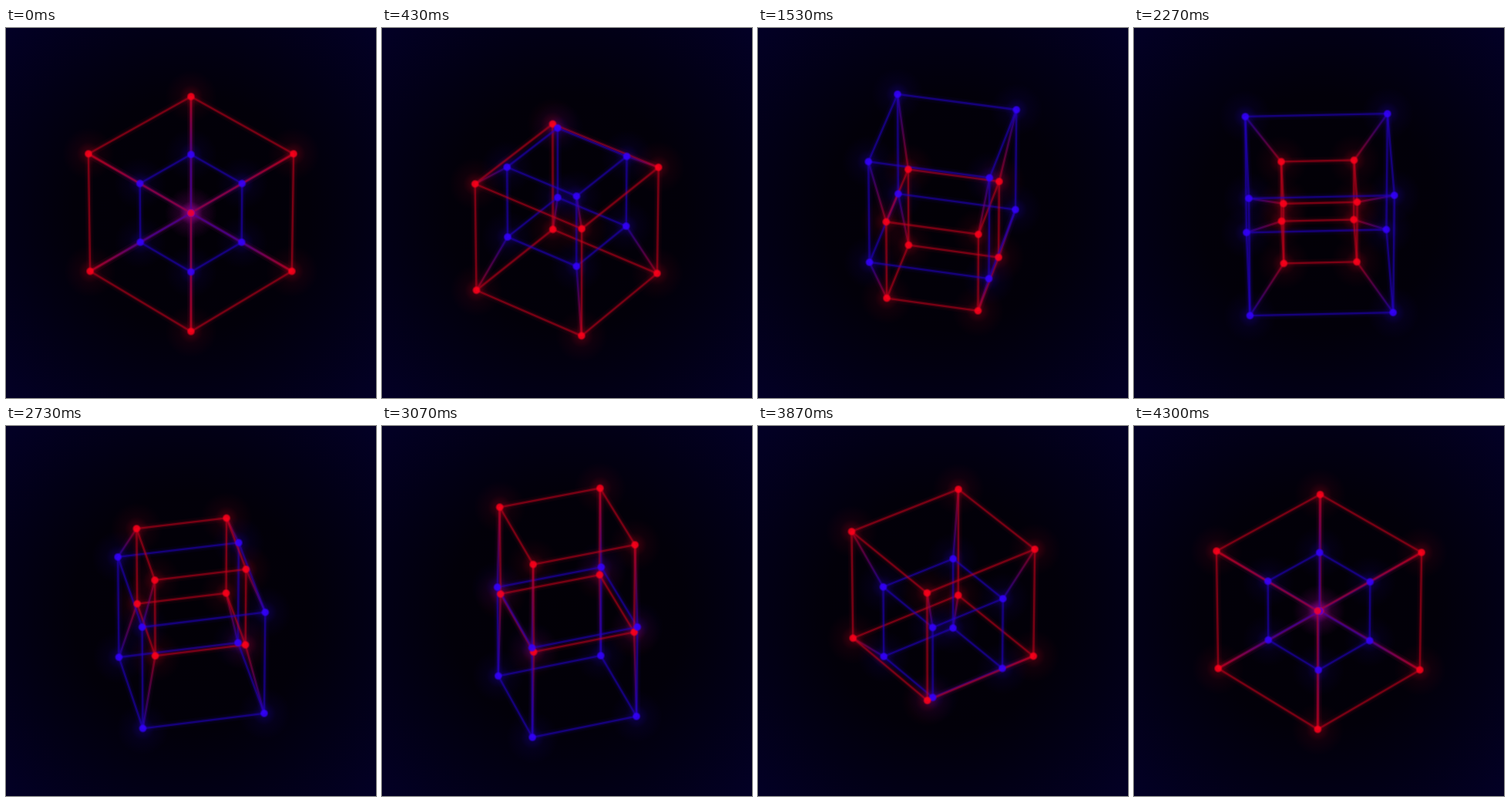
An HTML page with a canvas that plays this animation: 480 px wide and 480 px high, repeating every 4.33 s.

```html
<!DOCTYPE html>
<html lang="en">
<head>
<meta charset="utf-8">
<title>Tesseract</title>
<style>
  html, body { margin: 0; width: 100%; height: 100%; overflow: hidden; background: #000; }
  canvas { display: block; width: 100vw; height: 100vh; }
</style>
</head>
<body>
<canvas id="stage" width="480" height="480"></canvas>
<script>
const ctx = document.getElementById('stage').getContext('2d');
const SIZE = 480, MID = SIZE / 2;
const LOOP = 4330, STEPS = 130;
const UNIT = 46.66;                 // the cubes' half sides run between 1 and 2 units
const CAMERA = 6500;
const MORPH_LEAD = 0.0025;
const TILT = Math.atan(Math.SQRT1_2);
const SIN_TILT = Math.sin(TILT), COS_TILT = Math.cos(TILT);

const RED = { line: '200,0,26', dot: '255,0,26', glow: '255,0,20' };
const BLUE = { line: '34,0,200', dot: '52,0,255', glow: '40,0,255' };

// Key poses of the red cube as [growth, lift]; the blue cube takes the opposite.
const POSES = [[1, 0], [0, -1], [-1, 0], [0, 1]];

const CORNERS = [...Array(8).keys()].map(i =>
  [i & 1 ? 1 : -1, i & 2 ? 1 : -1, i & 4 ? 1 : -1]);
const EDGES = [];
for (let i = 0; i < 8; i++)
  for (const bit of [1, 2, 4])
    if (!(i & bit)) EDGES.push([i, i | bit]);

const rgba = (rgb, a) => `rgba(${rgb},${a})`;
const smooth = p => p * p * (3 - 2 * p);
const byDepth = (a, b) => a.depth - b.depth;

function poseAt(u) {
  const p = u * POSES.length;
  const i = Math.floor(p), e = smooth(p - i);
  const from = POSES[i % POSES.length], to = POSES[(i + 1) % POSES.length];
  return from.map((v, k) => v + (to[k] - v) * e);
}

function project([x, y, z], half, lift, spin, color) {
  const c = Math.cos(spin), s = Math.sin(spin);
  const px = (x * c - z * s) * half;
  const pz = (x * s + z * c) * half;
  const py = y * half + lift;
  const depth = pz * COS_TILT + py * SIN_TILT;
  const k = CAMERA / (CAMERA - depth);
  return {
    x: MID + px * k,
    y: MID + (pz * SIN_TILT - py * COS_TILT) * k,
    depth, color
  };
}

const link = (a, b) => ({ a, b, depth: (a.depth + b.depth) / 2 });

function drawLink({ a, b }) {
  const stroke = (width, alpha) => {
    const g = ctx.createLinearGradient(a.x, a.y, b.x, b.y);
    g.addColorStop(0, rgba(a.color.line, alpha));
    g.addColorStop(1, rgba(b.color.line, alpha));
    ctx.strokeStyle = g;
    ctx.lineWidth = width;
    ctx.beginPath();
    ctx.moveTo(a.x, a.y);
    ctx.lineTo(b.x, b.y);
    ctx.stroke();
  };
  stroke(10, 0.05);
  stroke(5, 0.15);
  stroke(2.3, 0.5);
}

function disc({ x, y }, radius, stops) {
  const g = ctx.createRadialGradient(x, y, 0, x, y, radius);
  for (const [at, color] of stops) g.addColorStop(at, color);
  ctx.fillStyle = g;
  ctx.fillRect(x - radius, y - radius, radius * 2, radius * 2);
}

function halo(p) {
  const { glow } = p.color;
  disc(p, 34, [
    [0, rgba(glow, 0.3)], [0.2, rgba(glow, 0.17)], [0.45, rgba(glow, 0.055)], [1, rgba(glow, 0)]]);
}

function core(p) {
  const { dot } = p.color;
  disc(p, 5.7, [[0, rgba(dot, 0.87)], [0.6, rgba(dot, 0.85)], [1, rgba(dot, 0)]]);
}

function background() {
  const g = ctx.createRadialGradient(MID, MID, 0, MID, MID, 340);
  g.addColorStop(0, '#020006');
  g.addColorStop(0.45, '#020009');
  g.addColorStop(0.7, '#020016');
  g.addColorStop(1, '#030026');
  ctx.fillStyle = g;
  ctx.fillRect(0, 0, SIZE, SIZE);
}

function draw(u) {
  const spin = Math.PI / 4 - u * Math.PI / 2;
  const [grow, lift] = poseAt(u + MORPH_LEAD);
  const cube = (side, color) => CORNERS.map(c =>
    project(c, (1.5 + side * grow / 2) * UNIT, side * lift * 1.5 * UNIT, spin, color));
  const red = cube(1, RED), blue = cube(-1, BLUE);
  const dots = [...blue, ...red].sort(byDepth);
  const links = [
    ...EDGES.map(([i, j]) => link(blue[i], blue[j])),
    ...EDGES.map(([i, j]) => link(red[i], red[j])),
    ...red.map((p, i) => link(p, blue[i]))
  ].sort(byDepth);

  ctx.globalCompositeOperation = 'source-over';
  background();
  ctx.globalCompositeOperation = 'lighter';
  dots.forEach(halo);
  ctx.globalCompositeOperation = 'source-over';
  links.forEach(drawLink);
  dots.forEach(core);
}

const start = performance.now();
function tick() {
  const t = performance.now() - start;
  const step = Math.floor((t + 4) * STEPS / LOOP) % STEPS;
  draw(step / STEPS);
  requestAnimationFrame(tick);
}
tick();
</script>
</body>
</html>
```
